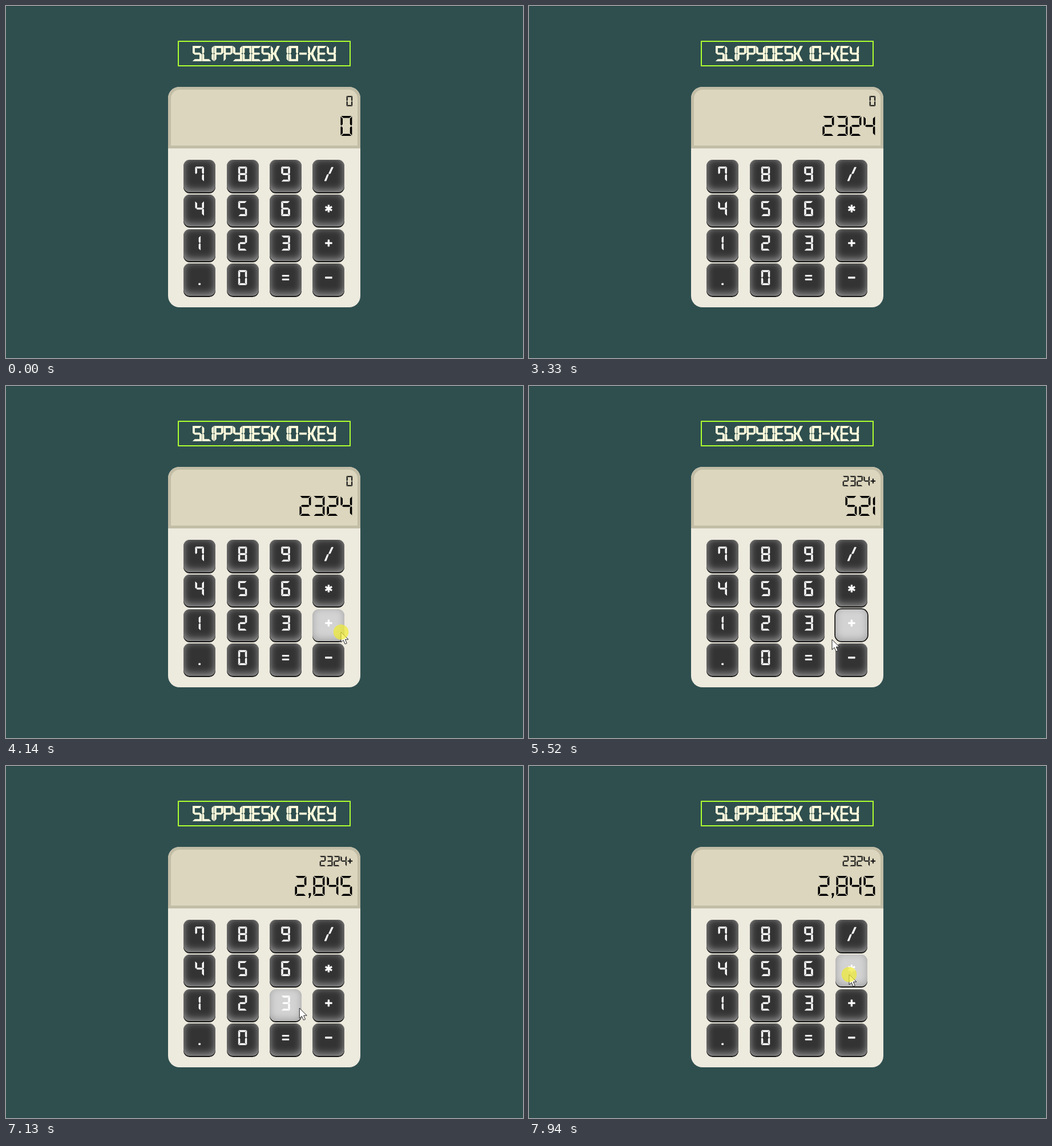
These frames come from a looping animation (906x618 px, 8 s). An HTML page:

```html
<!DOCTYPE html>
<html lang="en">
<head>
<meta charset="utf-8">
<title>Slippydesk 10-Key</title>
<style>
  html, body { margin: 0; width: 100%; height: 100%; overflow: hidden; background: #2f4f4f; }
  body { position: relative; box-shadow: inset 0 1px #294545; }
  div, svg { position: absolute; box-sizing: border-box; }
  #title { left: 301px; top: 61px; width: 303px; height: 45px; border: 2px solid #adff2f; }
  #body { left: 284px; top: 142px; width: 337px; height: 387px; border-radius: 20px; background: #edeade; }
  #screen { left: 284px; top: 142px; width: 337px; height: 108px; border: 5px solid #c2bda6;
    border-radius: 20px 20px 0 0; background: #dcd6be; }
  .key { width: 56px; height: 56.4px; border-radius: 11px; background: #333;
    box-shadow: inset 0 -3px 14px #a0a0a0, 0 2px #151515; }
  .lit { background: #d3d3d3; }
  .focus { box-shadow: inset 0 -3px 14px #a0a0a0, 0 0 0 1.7px #101010; }
  svg { left: 0; top: 0; }
</style>
</head>
<body>
<div id="title"></div>
<div id="body"></div>
<div id="screen"></div>
<div id="keys"></div>
<svg id="ink" width="906" height="618" viewBox="0 0 906 618">
  <path id="cursor" d="M0 0V18L4.2 14.2 7.2 21 10.3 19.7 7.3 13H13Z" fill="#fff" stroke="#222" stroke-width="1"/>
  <circle id="click" r="13.3" fill="#f0eb32" fill-opacity=".7"/>
</svg>
<script>
const $ = id => document.getElementById(id);

// Segment shapes in a 20 x 35 cell
const pairs = s => s.split(' ').map(p => p.split(',').map(Number));
const flip = (pts, fx, fy) => pts.map(([x, y]) => [fx ? 20 - x : x, fy ? 35 - y : y]);
const bar = (cx, cy, r, deg = 0, w = 1.8) => {
  const c = Math.cos(deg * Math.PI / 180), s = Math.sin(deg * Math.PI / 180);
  return [[-r, -w], [r, -w], [r, w], [-r, w]].map(([x, y]) => [cx + x * c - y * s, cy + x * s + y * c]);
};
const a = pairs('1,0 19,0 15.5,3.6 4.5,3.6');
const f = pairs('0,1 3.6,4.6 3.6,14.5 1.5,17 0,15.5');
const h = pairs('7,15.5 11.5,15.5 19.5,0 14.5,0');
const seg = {
  a, f, h,
  b: flip(f, 1, 0), c: flip(f, 1, 1), d: flip(a, 0, 1), e: flip(f, 0, 1), k: flip(h, 0, 1),
  g: pairs('2.5,17.5 4.5,15.7 15.5,15.7 17.5,17.5 15.5,19.3 4.5,19.3'),
  m: pairs('2.5,17.5 4.5,15.7 11,15.7 12,17.5 11,19.3 4.5,19.3')
};
const lit = {
  0: 'abcdef', 2: 'abged', 3: 'abgcd', 4: 'fgbc', 5: 'afgcd', 6: 'afgcde', 7: 'fabc', 8: 'abcdefg', 9: 'abcdfg',
  S: 'afgcd', L: 'fed', P: 'abfge', Y: 'fgbcd', D: 'abcdef', E: 'afged', K: 'femhk'
};
const stem = [seg.b, seg.c].map(p => p.map(([x, y]) => [x - 16, y]));
const marks = {
  1: [4, stem], I: [4, stem], ' ': [12, []],
  '.': [4, [bar(2, 33, 2)]],
  ',': [4, [pairs('0,30 4,30 4,34 1.5,39 0,39 1,34 0,34')]],
  '/': [20, [pairs('10,16.5 17,1 21,1 14,16.5'), pairs('0,34 4,34 10,18.5 6.5,18.5')]],
  '+': [16, [bar(8, 17.5, 8), bar(8, 17.5, 8, 90)]],
  '-': [20, [bar(10, 17.5, 8)]],
  '=': [16, [bar(8, 13, 8, 0, 1.5), bar(8, 22, 8, 0, 1.5)]],
  '*': [16, [30, 90, 150].map(deg => bar(8, 17.5, 8.7, deg))]
};
const glyph = ch => marks[ch] || [20, [...lit[ch]].map(s => seg[s])];

function makeText(color, weight) {
  const path = document.createElementNS('http://www.w3.org/2000/svg', 'path');
  path.setAttribute('fill', color);
  path.setAttribute('stroke', color);
  path.setAttribute('stroke-width', weight);
  path.setAttribute('role', 'img');
  $('ink').insertBefore(path, $('cursor'));
  return path;
}

// align: 0 left, 0.5 centre, 1 right
function write(path, text, x, y, scale, align = 0, gap = 4) {
  if (path.getAttribute('aria-label') === text) return;
  const glyphs = [...text].map(glyph);
  const width = glyphs.reduce((sum, [w]) => sum + w + gap, -gap);
  let pen = -width * align, d = '';
  for (const [w, shapes] of glyphs) {
    for (const pts of shapes)
      d += 'M' + pts.map(([px, py]) => (x + (pen + px) * scale).toFixed(2) + ' ' + (y + py * scale).toFixed(2)).join('L') + 'Z';
    pen += w + gap;
  }
  path.setAttribute('d', d);
  path.setAttribute('aria-label', text);
}

write(makeText('#fdfadb', 1.2), 'SLIPPYDESK 10-KEY', 327.6, 70.7, .735, 0, 2.5);

const keys = [...'789/456*123+.0=-'].map((label, i) => {
  const x = 311.2 + i % 4 * 75.4, y = 270.4 + (i >> 2) * 60.6;
  const el = document.createElement('div');
  el.className = 'key';
  el.style.left = x + 'px';
  el.style.top = y + 'px';
  $('keys').append(el);
  write(makeText('#fff', .7), label, x + 28, y + 11.9, .73, .5);
  return { label, x, y, el };
});

const small = makeText('#111', .3), big = makeText('#000', 0);

// time, entry, running total
const states = [
  [0, '0', '0'], [500, '2', '0'], [720, '23', '0'], [820, '2324', '0'],
  [4730, '0', '2324+'], [5030, '5', '2324+'], [5230, '52', '2324+'], [5440, '521', '2324+'],
  [7030, '2,845', '2324+']
];
// start, end, steps, from x, y, to x, y
const moves = [
  [3420, 4010, 6, 741, 503, 587, 432],
  [5520, 5940, 1, 531, 445, 531, 445],
  [5940, 6140, 2, 512, 455, 488, 468],
  [7030, 7330, 3, 488, 468, 543, 378],
  [7430, 7640, 2, 562, 364, 581, 360],
  [7740, 7850, 1, 574, 364, 561, 366]
];
const clicks = [[4140, 4730], [6240, 7030], [7940, 8000]];
const last = (list, t) => list.filter(item => item[0] <= t).pop();

function cursorAt(t) {
  const move = last(moves, t);
  if (!move) return null;
  const [t0, t1, n, x0, y0, x1, y1] = move;
  const p = Math.min(n, Math.floor((t - t0) / (t1 - t0) * n)) / n;
  const ease = 1 - (1 - p) ** 1.6;
  return [x0 + (x1 - x0) * ease, y0 + (y1 - y0) * ease];
}

function draw(t) {
  const [, entry, total] = last(states, t);
  write(big, entry, 606.4, 193, 1, 1);
  write(small, total, 607, 158, .51, 1);

  const pos = cursorAt(t);
  const down = pos && clicks.some(([from, to]) => t >= from && t < to);
  $('cursor').style.display = pos ? '' : 'none';
  $('click').style.display = down ? '' : 'none';
  if (pos) for (const id of ['cursor', 'click']) $(id).setAttribute('transform', `translate(${pos})`);

  for (const { label, x, y, el } of keys) {
    const over = pos && pos[0] >= x && pos[0] <= x + 56 && pos[1] >= y && pos[1] <= y + 57;
    const focus = label === '+' && t >= 4730 && t < 5940;
    el.className = 'key' + (over || focus ? ' lit' : '') + (focus ? ' focus' : '');
  }
}

const start = performance.now();
function tick() {
  draw((performance.now() - start) % 8000);
  requestAnimationFrame(tick);
}
tick();
</script>
</body>
</html>
```
